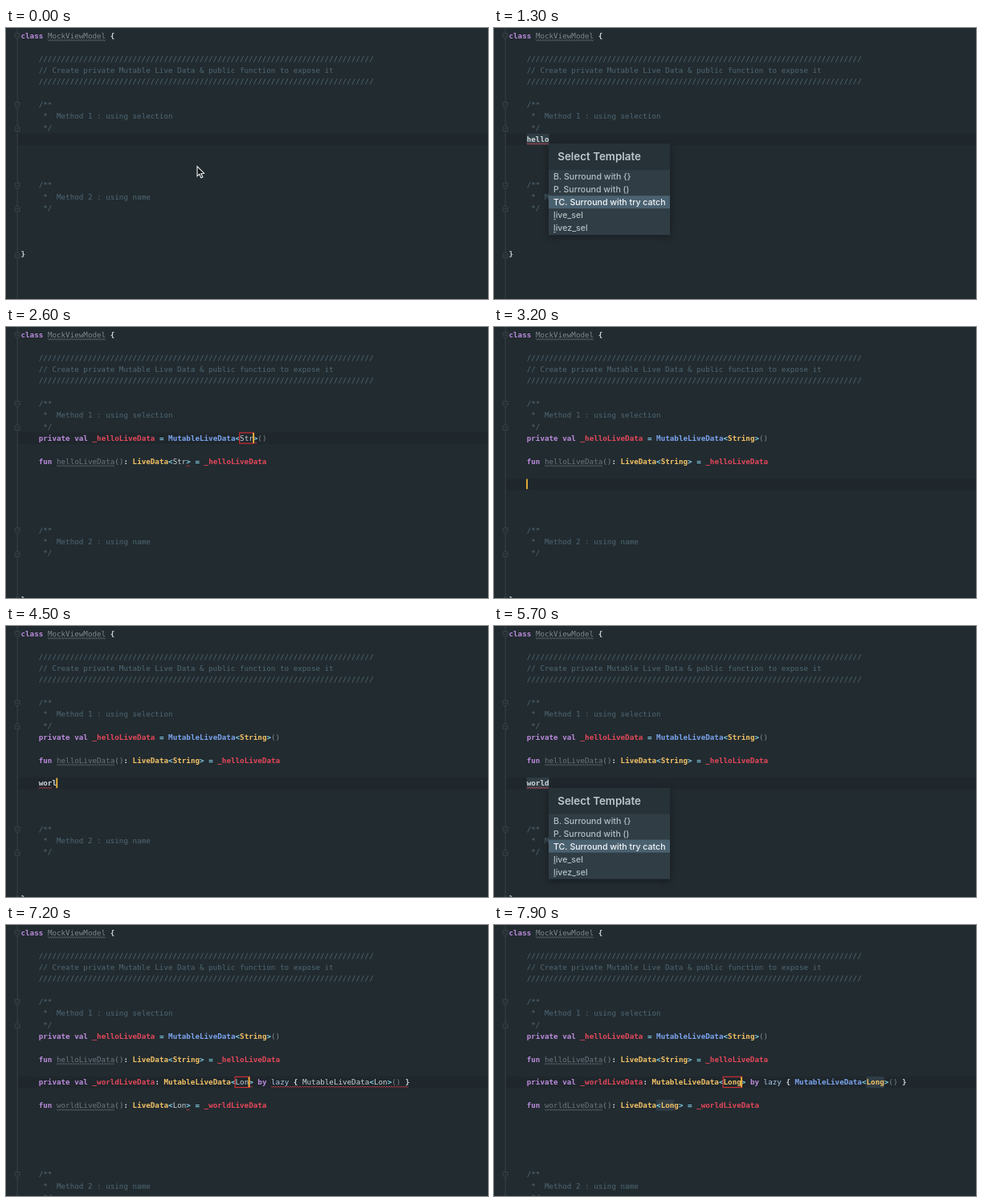
These frames come from a looping animation (600x338 px, 8000 ms). An HTML page with a canvas:

```html
<!DOCTYPE html>
<html lang="en">
<head>
<meta charset="utf-8">
<title>Live template demo</title>
<style>
html, body { margin: 0; width: 100%; height: 100%; overflow: hidden; background: #222b30; }
canvas { display: block; width: 600px; height: 338px; }
</style>
</head>
<body>
<canvas id="stage"></canvas>
<script>
const W = 600, H = 338, LOOP = 8000;
const CW = 5.563, LH = 14.35, X0 = 18.5, Y0 = 9.6;
const canvas = document.getElementById('stage');
const c = canvas.getContext('2d');
const dpr = window.devicePixelRatio || 1;
canvas.width = W * dpr;
canvas.height = H * dpr;

const MONO = '9.24px "DejaVu Sans Mono", monospace';
const UI = 'Inter, "Open Sans", sans-serif';
const RED = '#d8424f';

// style: [colour, bold]
const STYLE = {
  key: ['#bb8bdd', true],
  note: ['#4f6874', false],
  dim: ['#7d888d', false],
  unused: ['#69777e', false],
  plain: ['#ced8db', true],
  word: ['#c5d3d8', false],
  op: ['#84d3ea', true],
  bad: ['#e5475a', true],
  call: ['#7ba4ee', true],
  type: ['#f3c267', true],
  lazy: ['#a9c5e6', false]
};

const colX = col => X0 + col * CW;
const lineY = line => Y0 + line * LH;

function rect(x, y, w, h, fill) {
  c.fillStyle = fill;
  c.fillRect(x, y, w, h);
}

// Draws [text, style] pairs in sequence and returns the end column.
function code(line, col, ...parts) {
  for (const [text, style] of parts) {
    const [color, bold] = STYLE[style];
    c.font = (bold ? 'bold ' : '') + MONO;
    c.fillStyle = color;
    c.fillText(text, colX(col), lineY(line) + 3.2);
    col += text.length;
  }
  return col;
}

function squiggle(line, from, to, color) {
  const y = lineY(line) + 5.6, end = colX(to);
  c.strokeStyle = color;
  c.lineWidth = 0.8;
  c.beginPath();
  for (let x = colX(from), i = 0; x <= end; x += 1.5, i++) c.lineTo(x, y + (i % 2 ? 0.8 : -0.6));
  c.stroke();
}

function highlight(line, from, to) {
  rect(colX(from), lineY(line) - 7, (to - from) * CW, 14, '#303d45');
}

function caret(line, col) {
  rect(colX(col) - 0.6, lineY(line) - 6.6, 1.8, 12.6, '#f2b73a');
}

function fieldBox(line, from, to) {
  c.strokeStyle = '#d92f36';
  c.lineWidth = 1.1;
  c.strokeRect(colX(from) - 0.4, lineY(line) - 6.8, (to - from) * CW + 1.2, 13.2);
}

function fold(line, dir) {
  const y = lineY(line) + 0.6;
  c.beginPath();
  c.moveTo(11.2, y - 3.4 * dir);
  c.lineTo(17, y - 3.4 * dir);
  c.lineTo(17, y + 1.2 * dir);
  c.lineTo(14.1, y + 3.8 * dir);
  c.lineTo(11.2, y + 1.2 * dir);
  c.closePath();
  c.fillStyle = '#222b30';
  c.fill();
  c.strokeStyle = '#414c52';
  c.lineWidth = 0.8;
  c.stroke();
  rect(12.7, y - 0.4, 2.8, 0.8, '#414c52');
}

function docBlock(line, text) {
  code(line, 4, ['/**', 'note']);
  code(line + 1, 5, ['*  ' + text, 'note']);
  code(line + 2, 5, ['*/', 'note']);
  fold(line, 1);
  fold(line + 2, -1);
}

function getter(line, name, type, known, mark) {
  const start = 8 + name.length + 12;
  if (mark) highlight(line, start, start + type.length);
  const end = code(line, 4, ['fun ', 'key'], [name, 'unused'], ['()', 'dim'], [': ', 'plain'],
    ['LiveData', 'type'], ['<', 'op'], [type, known ? 'type' : 'word'], ['>', 'op']);
  code(line, end, [' = ', 'op'], ['_' + name, 'bad']);
  squiggle(line, 8, 8 + name.length, '#687379');
  if (!known) squiggle(line, end - 1, end, RED);
}

function eagerBlock(line, type, editing) {
  const known = type === 'String', style = known ? 'type' : 'word';
  code(line, 4, ['private val ', 'key'], ['_helloLiveData', 'bad'], [' = ', 'op'],
    ['MutableLiveData', 'call'], ['<', 'op'], [type, style], ['>', 'op'], ['()', 'dim']);
  const end = 49 + type.length;
  if (!known) squiggle(line, end, end + 1, RED);
  if (editing) {
    fieldBox(line, 49, end);
    caret(line, end);
  }
  getter(line + 2, 'helloLiveData', type, known, editing && known);
}

function lazyBlock(line, type) {
  const known = type === 'Long', style = known ? 'type' : 'word', n = type.length;
  if (known) highlight(line, 76 + n, 76 + 2 * n);
  const end = code(line, 4, ['private val ', 'key'], ['_worldLiveData', 'bad'], [': ', 'plain'],
    ['MutableLiveData', 'type'], ['<', 'op'], [type, style], ['>', 'op'], [' by ', 'key'],
    ['lazy', 'lazy'], [' { ', 'plain'], ['MutableLiveData', known ? 'call' : 'word'],
    ['<', 'op'], [type, style], ['>', 'op'], ['()', 'dim'], [' }', 'plain']);
  if (!known) {
    squiggle(line, 48 + n, 49 + n, RED);
    squiggle(line, 53 + n, end, RED);
  }
  fieldBox(line, 48, 48 + n);
  caret(line, 48 + n);
  getter(line + 2, 'worldLiveData', type, known, known);
}

const ITEMS = ['B. Surround with {}', 'P. Surround with ()', 'TC. Surround with try catch', 'live_sel', 'livez_sel'];

function popup(line, picked) {
  const x = 68, y = lineY(line) + 5.8;
  c.save();
  c.shadowColor = 'rgba(0,0,0,.35)';
  c.shadowBlur = 8 * dpr;
  c.shadowOffsetY = 2 * dpr;
  rect(x, y, 151, 113.6, '#303d44');
  c.restore();
  rect(x, y, 151, 32.6, '#273138');
  c.font = '600 13.4px ' + UI;
  c.fillStyle = '#bdc8cd';
  c.fillText('Select Template', x + 11.2, y + 20.6);
  c.font = '500 10.6px ' + UI;
  ITEMS.forEach((item, i) => {
    const top = y + 32.6 + i * 16;
    if (i === picked) rect(x, top, 151, 16, '#4a6170');
    c.fillStyle = i === picked ? '#f4f7f8' : '#b2bfc6';
    c.fillText(item, x + 6, top + 12);
    if (i > 2) c.fillRect(x + 6, top + 13.2, 3, 0.8);
  });
}

function pointer(x, y) {
  c.save();
  c.translate(x, y);
  c.beginPath();
  [[0, 0], [0, 12.2], [2.8, 9.7], [4.8, 14.4], [6.9, 13.5], [4.9, 8.9], [8.6, 8.7]].forEach(p => c.lineTo(...p));
  c.closePath();
  c.fillStyle = '#14191c';
  c.fill();
  c.strokeStyle = '#f1f3f4';
  c.lineWidth = 1.1;
  c.stroke();
  c.restore();
}

const typed = (word, t, start, step) =>
  word.slice(0, Math.max(0, Math.floor((t - start) / step) + 1));

// Number of moments already passed.
const passed = (t, ...times) => times.filter(at => t >= at).length;

function entry(line, word, full, selected, t) {
  if (selected) highlight(line, 4, 4 + word.length);
  code(line, 4, [word, 'plain']);
  const checked = word === full ? word.length : word.length - 1;
  if (checked > 0) squiggle(line, 4, 4 + checked, RED);
  if (!selected) caret(line, 4 + word.length);
}

function draw(t) {
  const first = t >= 1700, second = t >= 6500, done = t >= 3100;
  const shift = 4 * (first + second);
  c.setTransform(dpr, 0, 0, dpr, 0, 0);
  rect(0, 0, W, H, '#222b30');
  rect(15, lineY(done ? 13 : 9) - 7.2, W - 15, 14.35, '#1f272c');
  rect(13.7, 0, 0.9, H, '#39444a');

  code(0, 0, ['class ', 'key'], ['MockViewModel', 'dim'], [' {', 'plain']);
  squiggle(0, 6, 19, '#727d82');
  fold(0, 1);
  const rule = '/'.repeat(75);
  code(2, 4, [rule, 'note']);
  code(3, 4, ['// Create private Mutable Live Data & public function to expose it', 'note']);
  code(4, 4, [rule, 'note']);
  docBlock(6, 'Method 1 : using selection');
  docBlock(13 + shift, 'Method 2 : using name');
  code(19 + shift, 0, ['}', 'plain']);
  fold(19 + shift, -1);

  if (!first) {
    if (t >= 200) entry(9, typed('hello', t, 200, 100), 'hello', t >= 700, t);
    if (t >= 900) popup(9, passed(t, 1100, 1200, 1500));
  } else {
    eagerBlock(9, typed('String', t, 2300, 120), !done);
  }

  if (done && !second) {
    const word = typed('world', t, 4200, 100);
    if (word) entry(13, word, 'world', t >= 4900, t);
    else if ((t - 3100) % 1000 < 500) caret(13, 4);
    if (t >= 5200) popup(13, passed(t, 5500, 5700, 5900, 6100));
  }
  if (second) lazyBlock(13, typed('Long', t, 6800, 200));
  if (t < 200) pointer(238, 172.5);
}

let begin;
function tick(now) {
  if (begin === undefined) begin = now;
  draw(Math.floor(((now - begin) % LOOP) / 100) * 100);
  requestAnimationFrame(tick);
}
draw(0);
requestAnimationFrame(tick);
</script>
</body>
</html>
```
